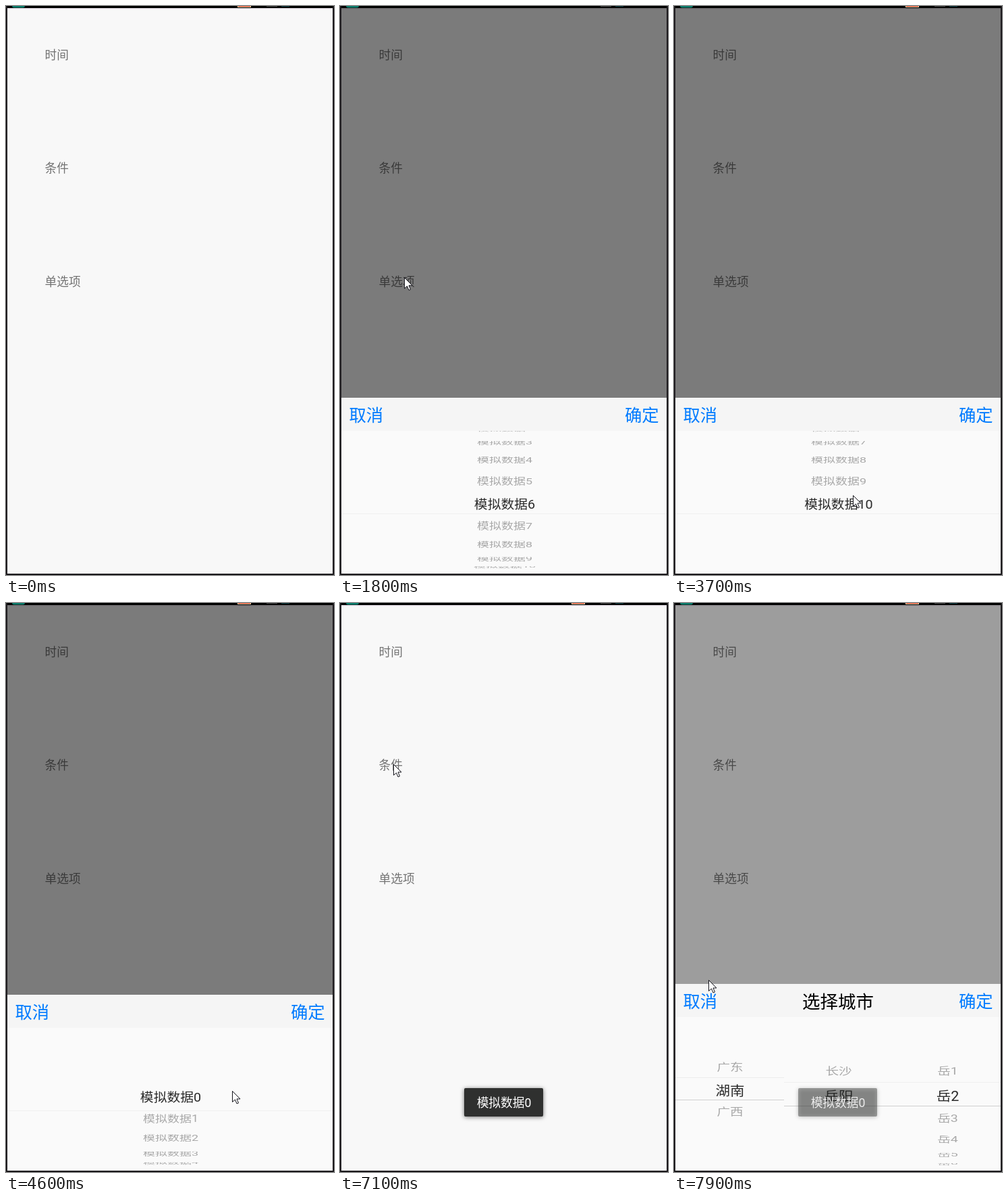
Recreate the animation shown at these times as an HTML page with a canvas. Size 486 by 841 pixels, loop 8000 ms.

```html
<!DOCTYPE html>
<html lang="zh-CN">
<head>
<meta charset="utf-8">
<style>
html, body { margin: 0; width: 100%; height: 100%; overflow: hidden; background: #1c1a1d; }
canvas { display: block; }
</style>
</head>
<body>
<canvas id="stage" width="486" height="841"></canvas>
<script>
const c = document.getElementById('stage').getContext('2d');
const LOOP = 8000, BLUE = '#007bff';
const FONT = 'Roboto, "Noto Sans CJK SC", "Noto Sans CJK", sans-serif';
const STEP = Math.PI / 10; // angle between neighbouring wheel items
const ARROW = new Path2D('M0 0V16L4 12.5L6.5 18.5L9 17.5L6.5 11.5H11.5Z');

// Moves of the pointer tip: start, end, x, y
const moves = [
  [200, 800, 86, 403], [1000, 1300, 95, 401], [1800, 2600, 268, 800], [2700, 3500, 265, 723],
  [3700, 4400, 271, 795], [4400, 5340, 440, 601], [5700, 6500, 193, 524],
  [6500, 7000, 79, 238], [7300, 7900, 51, 557]
];
// Moves of the data wheel: start, end, item
const flicks = [[2600, 3500, 10], [3700, 4740, 0]];

const mockData = Array.from({ length: 11 }, (_, i) => '模拟数据' + i);
const towns = Array.from({ length: 8 }, (_, i) => '岳' + (i + 1));

const ramp = (t, a, b) => Math.min(1, Math.max(0, (t - a) / (b - a)));
const easeOut = u => 1 - (1 - u) ** 2;

// Carries the start values through each move in turn
const glide = (start, legs, t) => legs.reduce((p, [a, b, ...end]) =>
  p.map((v, i) => v + (end[i] - v) * easeOut(ramp(t, a, b))), start);

function rect(x, y, w, h, color) {
  c.fillStyle = color;
  c.fillRect(x, y, w, h);
}

function pill(x, y, w, h, r, color) {
  c.fillStyle = color;
  c.beginPath();
  c.roundRect(x, y, w, h, r);
  c.fill();
}

function clip(x, y, w, h) {
  c.beginPath();
  c.rect(x, y, w, h);
  c.clip();
}

// Text with its ideographs centred vertically on y
function text(s, x, y, size, color, align = 'left') {
  c.font = `${size}px ${FONT}`;
  c.textAlign = align;
  c.fillStyle = color;
  c.fillText(s, x, y + size * 0.38);
}

function wheel(items, pos, x, mid, r, size) {
  items.forEach((s, i) => {
    const a = (i - pos) * STEP, cos = Math.cos(a), on = Math.abs(i - pos) < 0.5;
    if (Math.abs(a) > 1.5) return;
    c.save();
    c.translate(x, mid + r * Math.sin(a) + (on ? 3 : 11 * cos - 9.4));
    c.scale(on ? 1.1 : 1, on ? cos : 0.8 * cos);
    // Items lose more of their top the further they turn away
    if (!on) clip(-80, size * (0.25 - 0.8 * cos), 160, 2 * size);
    text(s, 0, 0, size, on ? '#2a2a2a' : '#a8a8a8', 'center');
    c.restore();
  });
}

function panel(top, title, body) {
  rect(2, top, 482, 49, '#f5f5f5');
  rect(2, top + 49, 482, 300, '#fafafa');
  text('取消', 13.5, top + 25.5, 25.3, BLUE);
  text('确定', 472.5, top + 25.5, 25.3, BLUE, 'right');
  text(title, 243, top + 25.5, 26.5, '#000', 'center');
  c.save();
  clip(2, top + 49, 482, 784 - top);
  body();
  c.restore();
}

function dataPanel(t) {
  panel(579, '', () => {
    rect(2, 750, 482, 1, '#f0f0f0');
    wheel(mockData, glide([6], flicks, t)[0], 244, 733.5, 106, 18);
  });
}

function cityPanel(t) {
  c.save();
  c.translate(0, 276 * (1 - easeOut(ramp(t, 7300, 7700))));
  panel(563, '选择城市', () => {
    rect(2, 701, 161, 1, '#ececec');
    rect(2, 734, 161, 1, '#d0d0d0');
    rect(163, 708, 321, 1, '#f0f0f0');
    rect(163, 743, 321, 1, '#d0d0d0');
    wheel(['广东', '湖南', '广西'], 1, 83, 717.5, 106, 19.6);
    wheel(['长沙', '岳阳'], 1, 244, 725.5, 114, 19.6);
    wheel(towns, 1, 405.5, 725.5, 114, 19.6);
  });
  c.restore();
}

function toast(alpha) {
  c.save();
  c.globalAlpha = alpha;
  c.shadowColor = 'rgba(0,0,0,.55)';
  c.shadowBlur = 6;
  c.shadowOffsetY = 1;
  pill(184, 717, 117, 42, 2, '#2f302f');
  c.shadowColor = 'transparent';
  c.globalAlpha = Math.min(1, alpha * 2);
  text('模拟数据0', 243, 738.5, 17.7, '#fff', 'center');
  c.restore();
}

function arrow([x, y]) {
  c.save();
  c.translate(Math.round(x) + 0.5, Math.round(y) + 0.5);
  c.fillStyle = '#fff';
  c.strokeStyle = '#15151c';
  c.fill(ARROW);
  c.stroke(ARROW);
  c.restore();
}

function statusBar(t) {
  rect(2, 0, 482, 3, '#000');
  pill(9, -4, 19, 6.5, 3, '#0b7d6c');
  if (t < 1600 || t >= 2200) {
    rect(343, 0, 20, 2, '#f4d9b0');
    rect(344, 0, 18, 1, '#d8341c');
  }
  rect(386, 0, 16, 1, '#4a4a4a');
  rect(408, 0, 12, 1, '#12444a');
}

function draw(t) {
  const dataOpen = t >= 1800 && t < 5700, cityOpen = t >= 7400;
  const dim = dataOpen ? 0.5 : 0.37 * ramp(t, 7300, 7900);

  rect(0, 0, 486, 841, '#1c1a1d');
  c.save();
  clip(2, 0, 482, 839);
  rect(2, 3, 482, 836, '#f8f8f8');
  rect(2, 3, 482, 1, '#d9d5da');
  rect(2, 4, 482, 1, '#f1ebf3');
  ['时间', '条件', '单选项'].forEach((s, i) => text(s, 57.5, 72 + 167.6 * i, 17.7, '#737373'));
  rect(2, 3, 482, 836, `rgba(0,0,0,${dim})`);
  statusBar(t);
  if (dataOpen) dataPanel(t);
  if (cityOpen) cityPanel(t);
  if (t >= 5800) toast(ramp(t, 5700, 6000) * (1 - 0.58 * ramp(t, 7700, 7900)));
  if (t >= 200) arrow(glide([325, 306], moves, t));
  c.restore();
}

function tick(now) {
  draw(Math.floor(now % LOOP / 100) * 100);
  requestAnimationFrame(tick);
}
requestAnimationFrame(tick);
</script>
</body>
</html>
```
